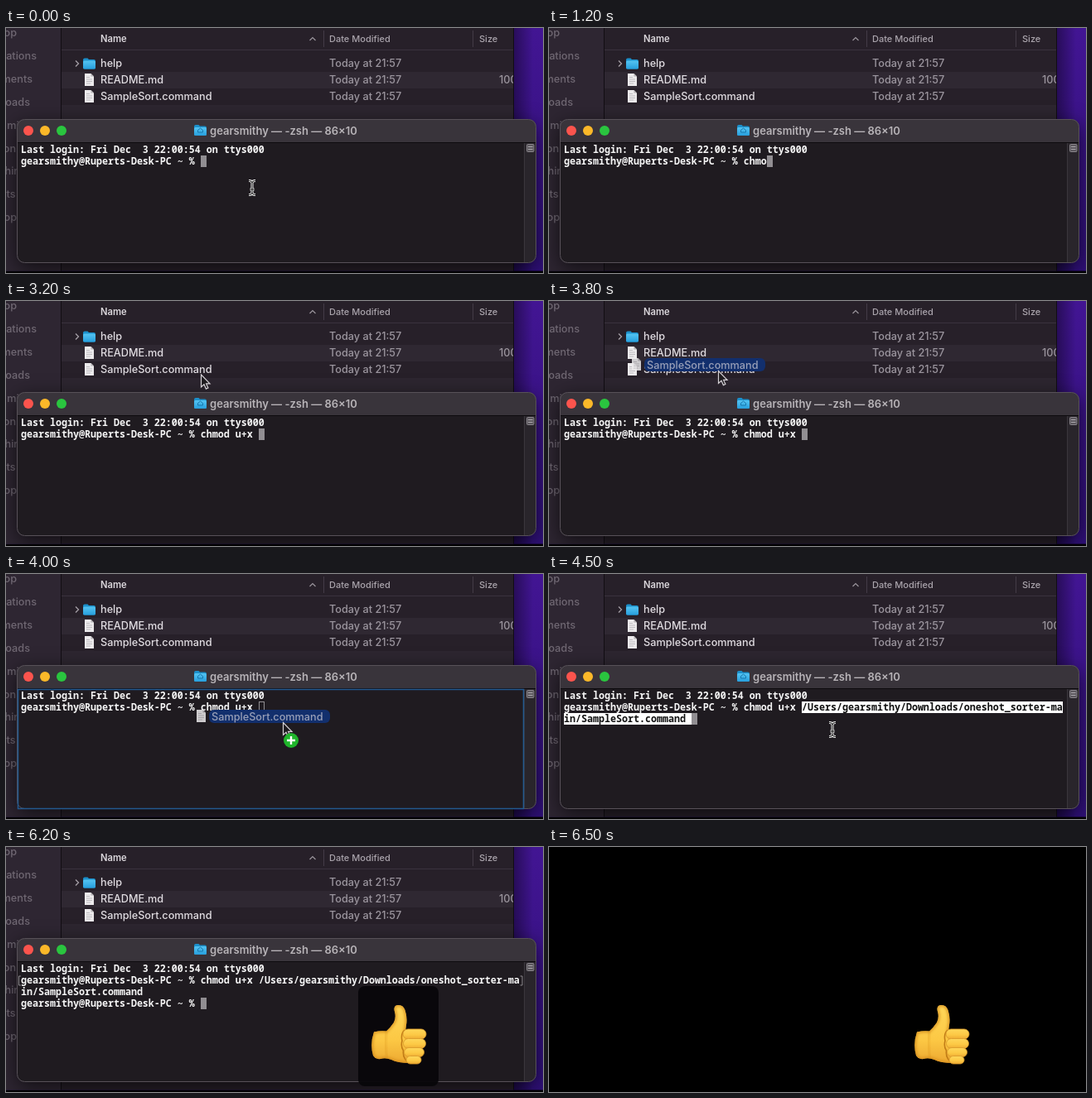
Animation of 648x296 px, one loop 6.9 s. Source, as an HTML page:

```html
<!DOCTYPE html>
<html lang="en">
<head>
<meta charset="utf-8">
<title>Make a script executable</title>
<style>
  html, body { margin: 0; width: 100%; height: 100%; overflow: hidden; background: #000; }
  svg { display: block; width: 648px; height: 296px; }
  text { white-space: pre; font: 500 12.7px Inter, Roboto, sans-serif; fill: #e0dce1; }
  .head text { font-size: 11px; fill: #aaa4ac; }
  .head .on { font-size: 11.2px; font-weight: 600; fill: #dcd8dd; }
  .dim { fill: #9b959e; }
  .side text { fill: #6f6772; }
  .title { font-size: 13px; font-weight: 600; fill: #b8b4b8; }
  .mono text { font: 600 11.667px "Noto Sans Mono", "DejaVu Sans Mono", monospace; fill: #f6f6f6; }
  .mono .picked { fill: #111; }
</style>
</head>
<body>
<svg viewBox="0 0 648 296">
  <defs>
    <linearGradient id="desk" x2="0" y2="1">
      <stop offset="0" stop-color="#421593"/><stop offset="1" stop-color="#2f1078"/>
    </linearGradient>
    <linearGradient id="edge">
      <stop offset="0" stop-opacity=".4"/><stop offset="1" stop-opacity="0"/>
    </linearGradient>
    <linearGradient id="blue" x2="0" y2="1">
      <stop offset="0" stop-color="#55c4f2"/><stop offset="1" stop-color="#279fdd"/>
    </linearGradient>
    <linearGradient id="skin" x2="0" y2="1">
      <stop offset="0" stop-color="#ffd75a"/><stop offset=".6" stop-color="#fcc844"/><stop offset="1" stop-color="#eda932"/>
    </linearGradient>
    <filter id="shade" x="-10%" y="-35%" width="120%" height="170%" color-interpolation-filters="sRGB">
      <feDropShadow dx="0" dy="6" stdDeviation="12" flood-opacity=".65"/>
    </filter>
    <filter id="soft"><feGaussianBlur stdDeviation="1.800"/></filter>
    <g id="folder">
      <path d="M0 2q0-2 2-2h3.500l1.500 1.500h6q2 0 2 2V11q0 2-2 2H2q-2 0-2-2z" fill="#1b8fca"/>
      <rect y="3" width="15" height="10" rx="1.500" fill="url(#blue)"/>
    </g>
    <g id="page">
      <path d="M0 0h7.500L11 3.500V15H0z" fill="#eceaec"/>
      <path d="M7.500 0V3.500H11z" fill="#b5b2b6"/>
      <path d="M2 4.500h4M2 7h7M2 9.500h7M2 12h5" stroke="#b4b1b6" stroke-width=".8"/>
    </g>
    <path id="beamShape" d="M-4-8.500q4 0 4 2.500V6q0 2.500-4 2.500M4-8.500q-4 0-4 2.500M4 8.500q-4 0-4-2.500M-2.500 2h5"/>
    <path id="hand" d="M444 223.500Q452 221.500 459 222.500Q464 218 468 212Q471 206 469 199Q467 192 472.500 191Q479 190 481.500 197Q484.500 206 483 215L482 222L488 240V261Q472 261 465 257Q458 254 452 256Q446 257 443 252Q439 238 444 223.500Z"/>
    <clipPath id="inHand"><use href="#hand"/></clipPath>
  </defs>

  <g id="scene">
    <rect width="648" height="293.500" fill="url(#desk)"/>
    <rect x="612" width="24" height="293.500" fill="url(#edge)"/>
    <!-- file browser -->
    <rect width="612.500" height="293.500" fill="#272029"/>
    <rect width="66" height="293.500" fill="#2e2632"/>
    <rect x="67" y="53" width="545" height="20" fill="#2f2832"/>
    <rect x="67" y="93" width="545" height="20" fill="#2d2630"/>
    <path d="M66.500 0V293.500M612.500 0V293.500" stroke="#110d13"/>
    <g class="side" id="side"></g>
    <g class="head">
      <path d="M67 26.500H612" stroke="#3a323d"/>
      <path d="M383.500 3V23M563.500 3V23" stroke="#443c47"/>
      <path d="M366.500 15l3.500-3.500 3.500 3.500" fill="none" stroke="#9a949c" stroke-width="1.200"/>
      <text class="on" x="114" y="17">Name</text>
      <text x="390" y="17">Date Modified</text>
      <text x="571" y="17">Size</text>
    </g>
    <path d="M84 39.500l3.500 3.500-3.500 3.500" fill="none" stroke="#a49ea6" stroke-width="1.300"/>
    <use href="#folder" x="93" y="36.500"/>
    <use href="#page" x="95" y="55"/>
    <use href="#page" x="95" y="75"/>
    <g id="files"></g>
    <svg x="590" width="22" height="100"><text class="dim" x="5" y="67">100</text></svg>

    <!-- terminal -->
    <g filter="url(#shade)"><rect x="13.500" y="110.500" width="626" height="173" rx="9" fill="#1f1b20"/></g>
    <path d="M13.500 138V119.500q0-9 9-9H630.500q9 0 9 9V138z" fill="#39343b"/>
    <path d="M14 138.500H639" stroke="#0d0b0e"/>
    <path d="M625.500 139H639V275q0 8-8 8.500H625.500z" fill="#29252b"/>
    <path d="M625.500 139V283.500" stroke="#3a363c"/>
    <rect x="628.500" y="140.500" width="8.500" height="9" rx="1" fill="#5d595f" stroke="#858187"/>
    <path d="M630 143.500h5.500M630 146.500h5.500" stroke="#b5b1b6" stroke-width=".9"/>
    <rect x="13.500" y="110.500" width="626" height="173" rx="9" fill="none" stroke="#575158"/>
    <circle cx="27" cy="124" r="6" fill="#fb544d"/>
    <circle cx="47" cy="124" r="6" fill="#fbb829"/>
    <circle cx="67" cy="124" r="6" fill="#2ac53f"/>
    <use href="#folder" x="227" y="117"/>
    <path d="M231.500 126v-2.500l3-2.500 3 2.500v2.500z" fill="none" stroke="#1777ad"/>
    <text class="title" id="title" x="246" y="128.500"></text>
    <rect id="ring" x="14.500" y="139.500" width="610" height="144" fill="none" stroke="#23598f" stroke-width="1.500"/>
    <g class="mono">
      <path id="pick" d="M305 154H620V168H305zM18 168H172V182H18z" fill="#fff"/>
      <rect id="caret" width="7" height="14"/>
      <text x="18" y="151">Last login: Fri Dec  3 22:00:54 on ttys000</text>
      <text x="18" y="165" id="line1"></text>
      <text x="305" y="165" id="path1"></text>
      <text x="18" y="179" id="path2"></text>
      <text x="18" y="193" id="line2"></text>
      <path id="marks" d="M18 156h-2.500v11h2.500M620.500 156h2.500v11h-2.500" fill="none" stroke="#8c898d"/>
    </g>

    <g id="ghost">
      <rect x="111" y="75" width="146" height="16" rx="6" fill="#122f6d"/>
      <use href="#page" x="96" y="75" opacity=".85"/>
      <text x="114" y="87.500" fill-opacity=".65">SampleSort.command</text>
    </g>
    <g id="beam" fill="none">
      <use href="#beamShape" stroke="#f2f2f2" stroke-width="3"/>
      <use href="#beamShape" stroke="#111" stroke-width="1"/>
    </g>
    <g id="arrow">
      <path d="M.5.500V15.500L4 12.300 6.400 17.600 8.900 16.500 6.600 11.400H11z" fill="#1d1a1e" stroke="#d5d1d6" stroke-width="1.200"/>
      <g id="plus">
        <circle cx="10" cy="22" r="9" fill="#1fb52b"/>
        <path d="M5 22H15M10 17V27" stroke="#fff" stroke-width="2.400"/>
      </g>
    </g>
    <rect id="panel" x="425" y="168" width="97" height="121" rx="8" fill="#08070a" fill-opacity=".95"/>
  </g>

  <rect id="black" width="648" height="296"/>
  <g id="thumb">
    <use href="#hand" fill="url(#skin)"/>
    <g clip-path="url(#inHand)" fill="none" stroke="#d68d1c">
      <use href="#hand" stroke-width="4" opacity=".75" filter="url(#soft)"/>
      <path d="M459 222Q456 238 460 255" stroke-width="2" opacity=".45" filter="url(#soft)"/>
    </g>
    <path d="M481 221Q476 226 478 234Q476 241 479.500 246Q478.500 254 484 259" fill="none" stroke="#c27d17" stroke-width="1.600"/>
    <g id="fingers" fill="url(#skin)" stroke="#d8982a" stroke-width=".8"></g>
  </g>
</svg>

<script>
const LOOP = 6900;
const user = "gearsmithy";
const prompt = `${user}@Ruperts-Desk-PC ~ % `;
const el = id => document.getElementById(id);

function add(parent, tag, attrs, text = "") {
  const node = document.createElementNS("http://www.w3.org/2000/svg", tag);
  for (const key in attrs) node.setAttribute(key, attrs[key]);
  node.textContent = text;
  el(parent).append(node);
}

// Sidebar labels, cut by the left edge: [label end, right x]
[["op", 13], ["ations", 37], ["ments", 32], ["loads", 29], [user.slice(5, 8), 20],
 ["ons", 19], ["hin", 17], ["ts", 11.5], ["op", 13]].forEach(([label, x], i) =>
  add("side", "text", { x, y: 10 + i * 27.9, "text-anchor": "end" }, label));
["help", "README.md", "SampleSort.command"].forEach((name, i) => {
  const y = 47.3 + i * 20;
  add("files", "text", { x: 114, y }, name);
  add("files", "text", { x: 390, y, class: "dim" }, "Today at 21:57");
});
[[479, 220, 28, 12], [479.5, 231.5, 27, 12], [480.5, 242.5, 24, 11], [483, 252.5, 18, 9.5]].forEach(
  ([x, y, width, height]) => add("fingers", "rect", { x, y, width, height, rx: height / 2 }));

el("title").textContent = `${user} — -zsh — 86×10`;
el("path1").textContent = `/Users/${user}/Downloads/oneshot_sorter-ma`;
el("path2").textContent = "in/SampleSort.command";

const DROP = 4500, ENTER = 6100, CHEER = 6200, END = 6500;
const command = "chmod u+x ";
// [time, characters typed]
const typed = [[0, 0], [500, 1], [1000, 3], [1200, 4], [1300, 5], [1400, 6],
  [1700, 7], [2000, 8], [2100, 9], [2600, 10]];
// [time, x, y, opacity]
const beam = [[0, 297, 193, 1], [500, 297, 193, .5], [600, 297, 193, .2], [700, 297, 193, 0],
  [2900, 314, 148, 1], [3000, 0, 0, 0], [DROP, 342, 188, 1], [4600, 341, 189, 1],
  [4700, 336, 191, 1], [4800, 327, 194, 1], [4900, 318, 197, 1], [5000, 312, 198, 1],
  [5100, 310, 199, 1], [5200, 309, 199.5, 1], [ENTER, 0, 0, 0]];
// [time, x, y]
const arrow = [[3000, 297, 126], [3100, 266, 105], [3200, 235, 88.5], [3300, 202, 82],
  [3400, 188, 81], [3600, 188, 80], [3800, 204, 84], [3900, 272, 136], [4000, 334, 179],
  [4100, 340, 186], [4200, 342, 188]];

const at = (steps, t) => steps.findLast(step => step[0] <= t);
const show = (id, on) => el(id).setAttribute("visibility", on ? "inherit" : "hidden");
const move = (id, x, y) => el(id).setAttribute("transform", `translate(${x} ${y})`);

function setCaret(col, row, hollow) {
  const inset = hollow ? .5 : 0;
  const attrs = { x: 18 + col * 7 + inset, y: 140 + row * 14 + inset, width: 7 - 2 * inset,
    height: 14 - 2 * inset, fill: hollow ? "none" : "#918e92", stroke: hollow ? "#918e92" : "none" };
  for (const key in attrs) el("caret").setAttribute(key, attrs[key]);
}

function draw(t) {
  const count = at(typed, t)[1];
  const dropped = t >= DROP, entered = t >= ENTER;
  const over = t >= 3900 && !dropped;

  el("line1").textContent = prompt + command.slice(0, count);
  el("line2").textContent = entered ? prompt : "";
  for (const id of ["path1", "path2"]) {
    show(id, dropped);
    el(id).classList.toggle("picked", !entered);
  }
  show("pick", dropped && !entered);
  show("marks", entered);
  show("ring", over);
  if (entered) setCaret(prompt.length, 3);
  else if (dropped) setCaret(22, 2);
  else setCaret(prompt.length + count, 1, over);

  const [, bx, by, alpha] = at(beam, t);
  move("beam", bx, by);
  el("beam").setAttribute("opacity", alpha);

  const spot = at(arrow, t);
  const dragging = t >= 3800 && t < 4400;
  show("arrow", spot && !dropped);
  show("plus", over && dragging);
  show("ghost", dragging);
  if (spot) {
    move("arrow", spot[1], spot[2]);
    move("ghost", spot[1] - 200, spot[2] - 90);
  }

  show("panel", t >= CHEER);
  show("thumb", t >= CHEER);
  show("black", t >= END);
}

const start = performance.now();
function tick() {
  draw((performance.now() - start) % LOOP);
  requestAnimationFrame(tick);
}
tick();
</script>
</body>
</html>
```
